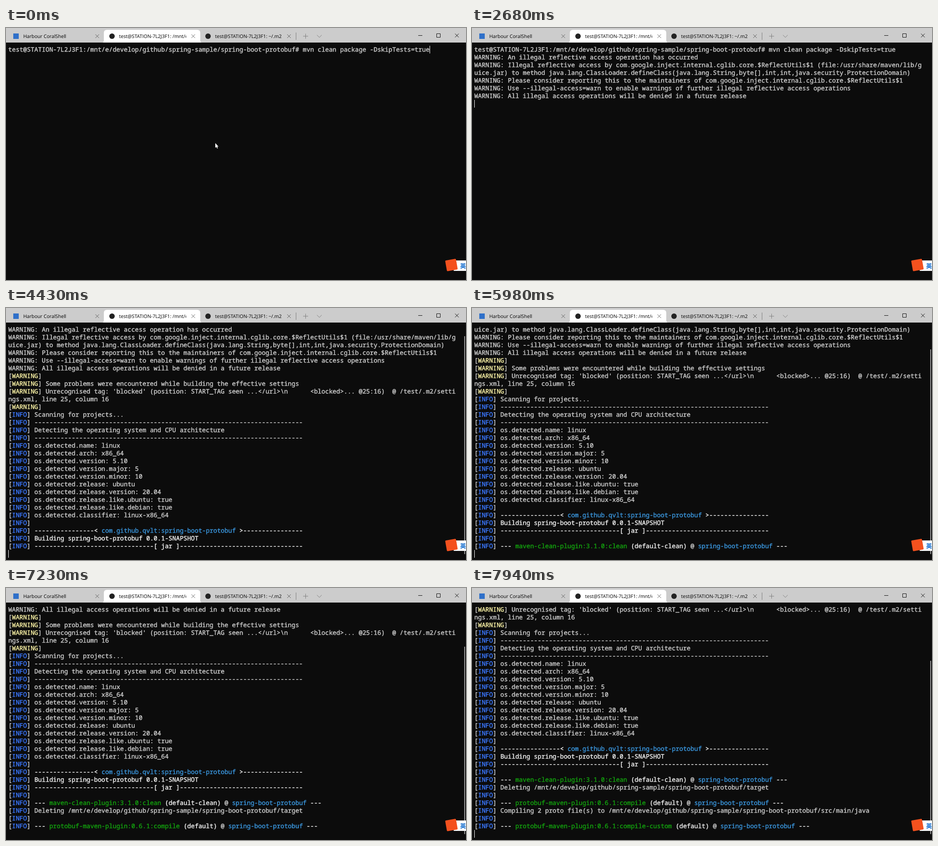
An HTML page that plays this animation: 1011 by 554 pixels, repeating every 8000 ms.

```html
<!DOCTYPE html>
<html lang="en">
<head>
<meta charset="utf-8">
<title>Terminal build</title>
<style>
html, body { margin: 0; width: 100%; height: 100%; overflow: hidden; }
body { position: relative; background: #0c0c0c; text-rendering: geometricPrecision; }
svg, #term, #caret, #thumb { position: absolute; }
svg { left: 0; top: 0; }
svg text { font: 10.65px "Open Sans", sans-serif; fill: #000; }
#term { left: 5px; top: 39px; width: 1000px; height: 513px; overflow: hidden; }
#lines div {
  height: 17px; white-space: pre; color: #ccc;
  font: 500 13.66px/17px "Noto Sans Mono", monospace;
  font-variant-ligatures: none;
  -webkit-text-stroke: .45px;
}
.info { color: #3b78ff; }
.warn { color: #f9f1a5; }
.bold { color: #f2f2f2; }
.mojo { color: #13a10e; }
.proj { color: #3a96dd; }
#caret { width: 1px; height: 17px; background: #fff; }
#thumb { left: 1007px; width: 2px; background: #9a9a9a; }
</style>
</head>
<body>
<div id="term"><div id="lines"></div></div>
<div id="caret"></div>
<div id="thumb"></div>

<svg width="1011" height="554" viewBox="0 0 1011 554">
  <defs>
    <path id="x" d="M-4-4 4 4M4-4-4 4" fill="none"/>
    <clipPath id="tabClip"><rect x="248" y="8" width="148" height="20"/></clipPath>
  </defs>
  <rect width="1011" height="32" fill="#ccc"/>
  <path d="M211 32q4 0 4-4V11q0-7 7-7h198q7 0 7 7v17q0 4 4 4z" fill="#fff"/>
  <rect x="16" y="12" width="12" height="12" fill="#2f70c9"/>
  <circle cx="233" cy="18" r="6" fill="#222"/>
  <circle cx="444" cy="18" r="6" fill="#222"/>
  <text x="38" y="22">Harbour CoralShell</text>
  <text x="248.5" y="22" clip-path="url(#tabClip)">test@STATION-7L2J3F1: /mnt/e</text>
  <text x="459.5" y="22">test@STATION-7L2J3F1: ~/.m2</text>
  <g stroke="#555" stroke-width=".9" fill="none">
    <use href="#x" x="200.5" y="18"/>
    <use href="#x" x="411.5" y="18"/>
    <use href="#x" x="622" y="18"/>
    <path d="M637.5 10v16M653 18h11M658.5 12.5v11M683.5 15.5l5.2 5.2 5.2-5.2" stroke="#777"/>
  </g>
  <g stroke="#111" fill="none">
    <path d="M906 16.5h9M946.5 12.5h8v8h-8z"/>
    <use href="#x" x="991" y="16.5"/>
  </g>
  <rect x="984" y="511" width="27" height="23" fill="#fff"/>
  <rect x="967" y="509" width="24" height="24" rx="2" fill="#f4511e" transform="rotate(-10 979 521)"/>
  <text x="998" y="527.5" style="font:700 13px 'Noto Sans CJK SC','Noto Sans CJK',sans-serif;fill:#0b68cc">英</text>
  <path id="pointer" d="M460 253v10.5l2.4-2.2 1.7 3.7 1.5-.7-1.6-3.5h3z" fill="#fff"/>
  <circle id="busy" cx="468" cy="253.5" r="3.7" fill="none" stroke="#4aa8e8" stroke-width="1.8"/>
</svg>

<script>
const $ = id => document.getElementById(id);
const span = (style, text) => `<span class="${style}">${text}</span>`;
const info = (text = '') => `[${span('info', 'INFO')}] ${text}`;
const warn = (text = '') => `[${span('warn', 'WARNING')}] ${text}`;
const dashes = n => '-'.repeat(n);
const app = 'spring-boot-protobuf';
const path = '/mnt/e/develop/github/spring-sample/' + app;
const goal = (mojo, id) => info(span('bold', '--- ') + span('mojo', mojo) + ' ' +
  span('bold', `(${id})`) + ' @ ' + span('proj', app) + span('bold', ' ---'));

const prompt = `test@STATION-7L2J3F1:${path}# mvn clean package -DskipTests=true`;
const detected = ['name: linux', 'arch: x86_64', 'version: 5.10', 'version.major: 5',
  'version.minor: 10', 'release: ubuntu', 'release.version: 20.04',
  'release.like.ubuntu: true', 'release.like.debian: true', 'classifier: linux-x86_64'];

const output = [
  prompt,
  'WARNING: An illegal reflective access operation has occurred',
  'WARNING: Illegal reflective access by com.google.inject.internal.cglib.core.$ReflectUtils$1 (file:/usr/share/maven/lib/g',
  'uice.jar) to method java.lang.ClassLoader.defineClass(java.lang.String,byte[],int,int,java.security.ProtectionDomain)',
  'WARNING: Please consider reporting this to the maintainers of com.google.inject.internal.cglib.core.$ReflectUtils$1',
  'WARNING: Use --illegal-access=warn to enable warnings of further illegal reflective access operations',
  'WARNING: All illegal access operations will be denied in a future release',
  warn(),
  warn('Some problems were encountered while building the effective settings'),
  warn("Unrecognised tag: 'blocked' (position: START_TAG seen ...&lt;/url>\\n      &lt;blocked>... @25:16)  @ /test/.m2/setti"),
  'ngs.xml, line 25, column 16',
  warn(),
  info('Scanning for projects...'),
  info(dashes(72)),
  info('Detecting the operating system and CPU architecture'),
  info(dashes(72)),
  ...detected.map(item => info('os.detected.' + item)),
  info(),
  info(span('bold', dashes(16) + '&lt; ') + span('proj', 'com.github.qvlt:' + app) + span('bold', ' >' + dashes(16))),
  info(span('bold', `Building ${app} 0.0.1-SNAPSHOT`)),
  info(span('bold', dashes(32) + '[ jar ]' + dashes(33))),
  info(),
  goal('maven-clean-plugin:3.1.0:clean', 'default-clean'),
  info(`Deleting ${path}/target`),
  info(),
  goal('protobuf-maven-plugin:0.6.1:compile', 'default'),
  info(`Compiling 2 proto file(s) to ${path}/src/main/java`),
  info(),
  goal('protobuf-maven-plugin:0.6.1:compile-custom', 'default'),
];
$('lines').innerHTML = output.map(line => `<div>${line}</div>`).join('');
const rows = [...$('lines').children];

// start ms, lines printed, rows scrolled, rows the scrollbar reports
const prints = [
  [0, 1, 0, 0], [2680, 7, 0, 0], [2950, 13, 0, 0], [4310, 26, 0, 0],
  [4430, 30, 1, 1], [5980, 32, 3, 3], [6280, 33, 3, 4], [6680, 33, 4, 4],
  [6800, 35, 6, 6], [7790, 36, 7, 6], [7940, 38, 9, 9],
];
// the caret starts on and flips at each of these times
const blinks = [710, 1270, 1830, 2250, 2800, 3480, 3880, 4430, 4990, 5550, 6130, 6680, 7230, 7790];
const LOOP = 8000, ENTER = 2250, ROW = 17, COL = 8.196, TRACK = 495;

const show = (el, on) => { el.style.visibility = on ? 'visible' : 'hidden'; };

function draw(t) {
  const [, count, top, bar] = prints.findLast(p => p[0] <= t);
  rows.forEach((row, i) => show(row, i < count));
  $('lines').style.transform = `translateY(${-top * ROW}px)`;

  const typing = t < ENTER;
  const caret = $('caret');
  caret.style.left = (typing ? Math.round(5 + prompt.length * COL) : 5) + 'px';
  caret.style.top = 39 + (typing ? 0 : count - top) * ROW + 'px';
  show(caret, blinks.filter(b => b <= t).length % 2 === 0);

  const offset = TRACK * bar / (30 + bar);
  $('thumb').style.top = 46 + offset + 'px';
  $('thumb').style.height = TRACK - offset + 'px';
  show($('thumb'), bar > 0);

  show($('pointer'), typing);
  show($('busy'), t >= 1980 && t < 2100);
}

const start = performance.now();
function tick() {
  draw((performance.now() - start) % LOOP);
  requestAnimationFrame(tick);
}
tick();
</script>
</body>
</html>
```
